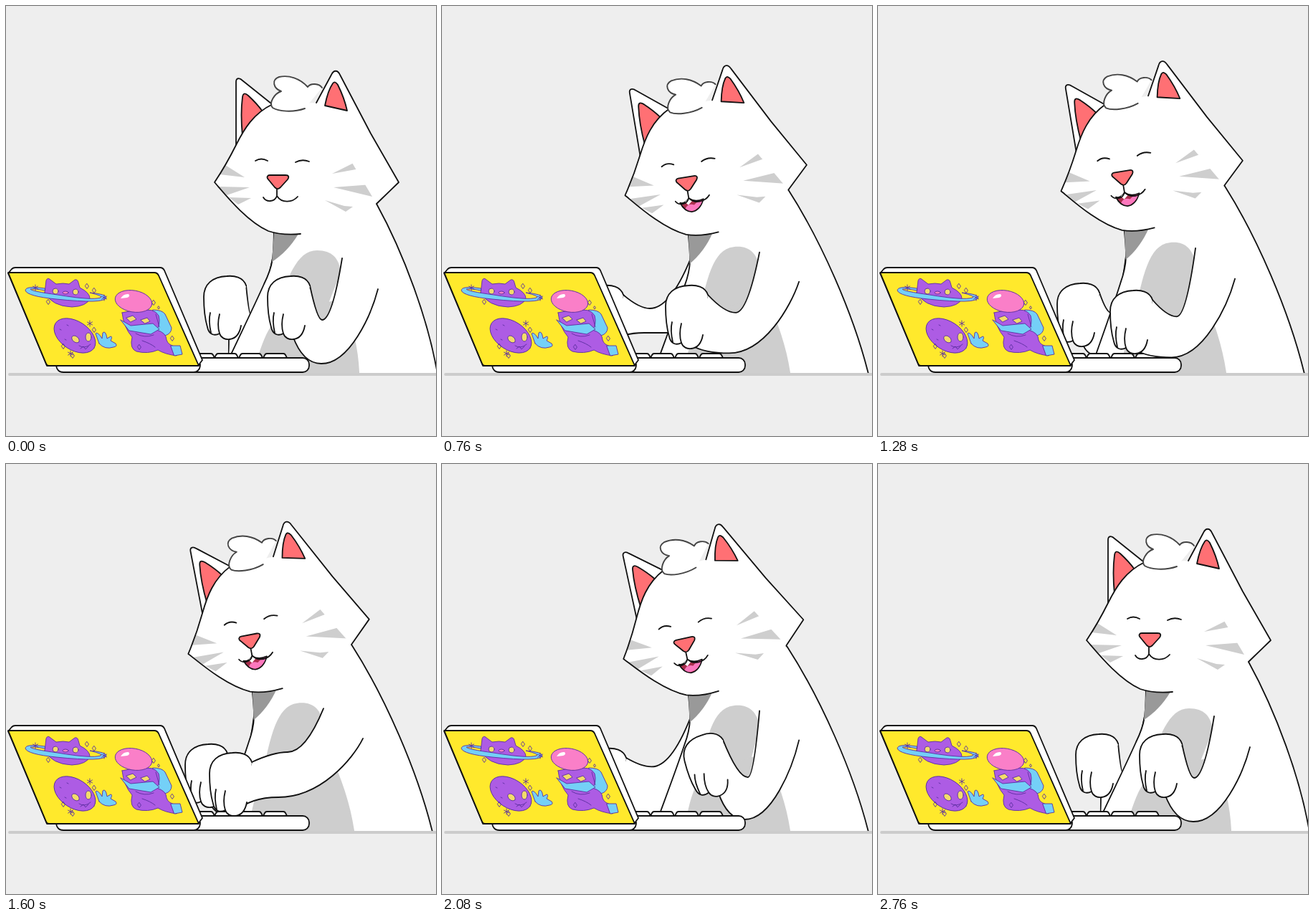
Write an HTML page that moves like this. It is 600 by 600 pixels and loops after 2800 ms.

```html
<!DOCTYPE html>
<html lang="en">
<head>
<meta charset="utf-8">
<title>Typing cat</title>
<style>
  html, body { margin: 0; width: 100%; height: 100%; overflow: hidden; background: #eee; }
  svg { display: block; width: 100vw; height: 100vh; }
  path, rect, ellipse, circle { stroke-linejoin: round; stroke-linecap: round; }
  .line { fill: none; stroke: #111; stroke-width: 1.8; }
  .skin { fill: #fff; stroke: #111; stroke-width: 1.8; }
  .white { fill: #fff; }
  .gray { fill: #cecece; }
  .dark { fill: #999; }
  .red { fill: #ff7074; stroke: #111; stroke-width: 1.8; }
  .hair { fill: #fff; stroke: #444; stroke-width: 1.9; }
  .art { stroke: #5b2fa0; stroke-width: .9; fill: #ad5ce4; }
  .art .cyan { fill: #74d0f7; }
  .art .pink { fill: #fa7fc8; }
  .art .lime { fill: #f3dc6b; }
  .art .none { fill: none; }
</style>
</head>
<body>
<svg viewBox="0 0 600 600">
  <rect width="600" height="600" fill="#eee"/>
  <g id="leftArm"></g>
  <g id="body">
    <path class="skin" d="M374 300C374 350 373 362 360 388C348 415 330 452 314 486L300 514L602 514C590 440 555 345 517 276L500 255"/>
    <path class="dark" d="M374 316L408 318C398 335 385 348 371 357Z"/>
    <path class="gray" d="M372 440C392 380 405 341 434 341C455 341 465 352 467 372L440 440Z"/>
    <path class="gray" d="M345 512C362 450 375 430 400 425L470 408C484 445 492 480 493 512Z"/>
  </g>
  <g class="skin">
    <path id="key" d="M258 491l2-4q1-2 3-2h23q2 0 3 2l2 4z"/>
    <use href="#key" x="33"/><use href="#key" x="67"/><use href="#key" x="101"/>
  </g>
  <g id="rightArm"></g>
  <g id="head">
    <path class="skin" d="M321 196L321 106C321 100 326 100 330 104L370 136"/>
    <path class="red" d="M330 182Q327 150 330 127Q331 119 338 125Q350 136 358 147Z"/>
    <path class="white" d="M411 318C390 320 375 317 366 314C335 300 305 262 291 246L321 194C332 172 345 150 372 137L433 135L460 90L509 178L548 246L517 276Z"/>
    <path class="gray" d="M455 234L521 201L532 220ZM457 253L548 246L523 269ZM445 271L472 279L484 280L474 287Z"/>
    <path class="gray" d="M333 239L306 222L298 235ZM340 253L296 252L308 264ZM342 268L311 267L324 277Z"/>
    <path class="line" d="M411 318C390 320 375 317 366 314C335 300 305 262 291 246C303 228 312 212 321 194C332 172 345 150 372 137"/>
    <path class="skin" d="M433 135L454 96C457 89 463 89 466 96L509 178L548 246L517 276"/>
    <path class="hair" d="M417 143C400 149 380 147 372 142C366 135 375 122 384 119C373 115 370 103 381 99C395 96 410 101 421 113C425 107 437 108 441 114"/>
    <path class="red" d="M445 139Q449 118 456 108Q459 104 463 110Q472 128 476 146Z"/>
    <g id="face">
      <path class="line" d="M348 216Q356 211 365 216M404 218Q413 213 423 217"/>
      <g id="grin">
        <path class="line" fill="none" d="M365 270Q371 273 378 266Q386 273 398 270Q391 285 379 285Q369 283 365 270Z" style="fill:#a92f4c"/>
        <path d="M371 279Q376 272 384 276Q390 271 397 271Q390 284 379 284Q374 283 371 279Z" fill="#fc78bd"/>
        <path d="M372 270L378 266L382 270L376 275Z" fill="#fff"/>
      </g>
      <path class="line" d="M378 255L378 265M359 267C363 274 375 274 378 265C385 276 400 274 407 266"/>
      <path class="red" d="M368 236L390 236C395 236 395 239 393 242L383 253C380 256 378 256 375 253L366 242C363 239 365 236 368 236Z"/>
    </g>
  </g>
  <path d="M5 514H600" stroke="#ccc" stroke-width="4"/>
  <g class="skin">
    <rect x="250" y="491" width="173" height="20" rx="9"/>
    <path d="M70 501Q71 511 80 511H262Q271 510 271 500Z"/>
    <path d="M3 373L8 367Q10 365 13 365H215Q219 365 221 369L274 494L268 502L57 502Z"/>
    <path d="M3 372H207Q211 372 213 376L269 502H60Q57 502 56 499Z" style="fill:#ffe92c"/>
  </g>
  <g class="art">
    <path d="M54 400L56 383Q58 378 62 382L70 388Q80 386 88 388L96 382Q100 381 101 386L103 393Q117 400 117 408Q113 419 92 420Q64 419 54 400Z"/>
    <path class="cyan" d="M54 394Q27 390 27 397Q30 405 70 409Q137 416 140 407Q140 402 117 400Q137 405 132 407Q120 411 72 403Q35 398 34 395Q40 394 54 397Z"/>
    <circle class="lime" cx="69" cy="398" r="4"/><circle class="lime" cx="97" cy="399" r="4"/>
    <ellipse class="pink" cx="83" cy="400" rx="4" ry="2"/>
    <ellipse cx="96" cy="460" rx="32" ry="20" transform="rotate(33 96 460)"/>
    <ellipse class="lime" cx="97" cy="465" rx="6" ry="4" transform="rotate(40 97 465)"/>
    <ellipse class="lime" cx="115" cy="462" rx="4" ry="6"/>
    <path class="none" d="M102 474q8 5 16-2M104 478l4-3 3 4 4-4M75 451l2 1m8-7l2 1m-5 19l2 1"/>
    <path class="cyan" d="M130 471L125 457Q128 454 134 464L135 456Q139 452 141 464L146 461Q149 461 146 467L153 471Q156 475 150 476Q138 480 130 471Z"/>
    <path class="cyan" d="M205 424Q218 424 222 430L231 449Q231 457 222 460L207 455Z"/>
    <path d="M162 428Q172 425 186 426Q206 420 213 432Q216 444 210 452Q224 456 224 466Q226 474 240 476L244 482L238 488Q222 486 212 480Q198 486 182 482Q172 478 176 462Q164 448 162 428Z"/>
    <path class="cyan" d="M160 438L174 446L205 443L214 451L202 458L172 453Z"/>
    <path class="cyan" d="M230 474L243 474L246 486L235 488Z"/>
    <path class="lime" d="M168 435l9-3 5 5-8 4zM188 438l9-3 4 5-7 3z"/>
    <path class="none" d="M181 457q12 7 25 2M190 467q12 4 18 9M209 430l5 18"/>
    <ellipse class="pink" cx="178" cy="412" rx="26" ry="15" transform="rotate(10 178 412)"/>
    <path d="M160 408q4-7 11-6q3 3-2 5z" fill="#fff" stroke="none"/>
    <path class="none" id="sparks"/>
  </g>
</svg>
<script>
const LOOP = 2800, STEP = 40;

// Key poses: head bob and face lift, hands as [x, y, turn], height of the left elbow
const pose = (t, bob, lift, right, left, sag) => ({ t, v: [bob, lift, ...right, ...left, sag] });
const rest = t => pose(t, 0, 0, [393, 420, 0], [304, 420], 486);
const POSES = [
  rest(0),
  pose(320, 2.5, -8.5, [321, 425, 14], [286, 426], 487),
  pose(760, 2.5, -1, [340, 433, 0], [222, 433], 456),
  pose(1280, -3.5, -3, [352, 440, 0], [278, 430], 486),
  pose(1600, 0, 0, [312, 446, 0], [278, 434], 487),
  pose(2080, 3.5, 0, [369, 421, -14], [226, 440], 490),
  rest(2740), rest(LOOP)
];
const PALM = "M31 -30C27 -42 14 -44 4 -43C-16 -42 -28 -32 -28 -14C-28 5 -26 18 -23 28C-21 38 -14 41 -6 37C-4 43 2 46 8 45C17 44 22 37 24 26";
const FINGERS = "M-19 8C-21 16 -20 27 -18 36M-6 10C-8 18 -9 28 -6 37";

const $ = id => document.getElementById(id);
const lerp = (a, b, t) => a + (b - a) * t;
const clamp = x => Math.min(1, Math.max(0, x));
const ease = x => (x = clamp(x), x * x * (3 - 2 * x));
const tag = (cls, d) => `<path class="${cls}" d="${d}"/>`;
const mapPoints = (d, f) => d.replace(/(-?[\d.]+) (-?[\d.]+)/g,
  (_, x, y) => f(+x, +y).map(n => n.toFixed(2)).join(" "));

function poseAt(t) {
  const i = POSES.findIndex(p => p.t > t), a = POSES[i - 1], b = POSES[i];
  const u = ease((t - a.t) / (b.t - a.t));
  return a.v.map((v, k) => lerp(v, b.v[k], u));
}

// Sleeve from shoulder over the inner elbow to the hand, and back along the outer elbow
function arm([x, y, turn], [ex, ey], [lx, ly], [sx, sy], [tx, ty]) {
  const r = turn * Math.PI / 180, cos = Math.cos(r), sin = Math.sin(r);
  const place = (px, py) => [x + px * cos - py * sin, y + px * sin + py * cos];
  const [kx, ky] = place(31, -30), [wx, wy] = place(7, 40);
  const sleeve = `M${sx} ${sy}Q${lerp(ex, sx, .5)} ${ey} ${ex} ${ey}Q${lerp(ex, kx, .4)} ${ey} ${kx} ${ky}` +
    `L${wx} ${wy}Q${lerp(wx, lx, .35)} ${ly} ${lx} ${ly}` +
    `C${lerp(lx, tx, .5)} ${ly} ${lerp(lx, tx, .88)} ${lerp(ty, ly, .35)} ${tx} ${ty}`;
  return tag("skin", sleeve) + tag("skin", mapPoints(PALM, place)) + tag("line", mapPoints(FINGERS, place));
}

function rightArm(hand, shoulder, side) {
  const x = hand[0], reach = (393 - x) / 81;
  return arm(hand, [441 - 48 * reach, 438 - 36 * reach ** 3], [440 - 60 * reach, 499 - 34 * reach ** 2], shoulder, side);
}
function leftArm([x, y], sag, shoulder) {
  const out = x - 222;
  return arm([x, y, 0], [290 + out * .63, 422 + out * .11], [282 + out * .35, sag], shoulder, [360, 455]);
}

const torso = [...$("body").children].map(el => [el, el.getAttribute("d")]);

function draw(t) {
  const [bob, lift, rx, ry, turn, hx, hy, sag] = poseAt(t);
  const lean = ease(t / 300) - ease((t - 2300) / 440);
  const tilt = .5 + 1.6 * Math.cos(2 * Math.PI * (t - 1020) / 2200);

  // The torso bends more the higher it is above the table
  const bend = (x, y) => {
    const k = (512 - y) / 236;
    return [x - lean * (7 + 28 * k), y - lean * 24 * k * (x - 374) / 143 + bob * clamp(k * 1.4)];
  };
  for (const [el, d] of torso) el.setAttribute("d", mapPoints(d, bend));
  $("leftArm").innerHTML = leftArm([hx, hy], sag, bend(372, 352));
  $("rightArm").innerHTML = rightArm([rx, ry, turn], bend(469, 352), bend(519, 395));
  $("head").setAttribute("transform",
    `translate(${-25.6 * lean} ${bob - 6.4 * lean}) rotate(${lean * (tilt - 11.2)} 419 317)`);
  $("face").setAttribute("transform", `translate(0 ${lift})`);
  $("grin").style.display = lean > .5 ? "" : "none";
}

const spark = (x, y, s = 3.5) => `M${x} ${y - s}l${s * .7} ${s}l${-s * .7} ${s}l${-s * .7} ${-s}z`;
const star = (x, y, s = 4) => [0, 1, 2].map(i => {
  const dx = s * Math.cos(i * Math.PI / 3 + .5), dy = s * Math.sin(i * Math.PI / 3 + .5);
  return `M${x - dx} ${y - dy}L${x + dx} ${y + dy}`;
}).join("");
$("sparks").setAttribute("d",
  spark(59, 413) + spark(113, 391) + spark(123, 397) + spark(206, 414) + spark(213, 421, 2) +
  spark(186, 476) + spark(80, 475) + spark(123, 452) + spark(232, 464) + spark(93, 488) +
  star(41, 393) + star(137, 407) + star(117, 443) + star(90, 485));

const start = performance.now();
function tick() {
  const t = (performance.now() - start) % LOOP;
  draw(Math.floor(t / STEP) * STEP);
  requestAnimationFrame(tick);
}
tick();
</script>
</body>
</html>
```
